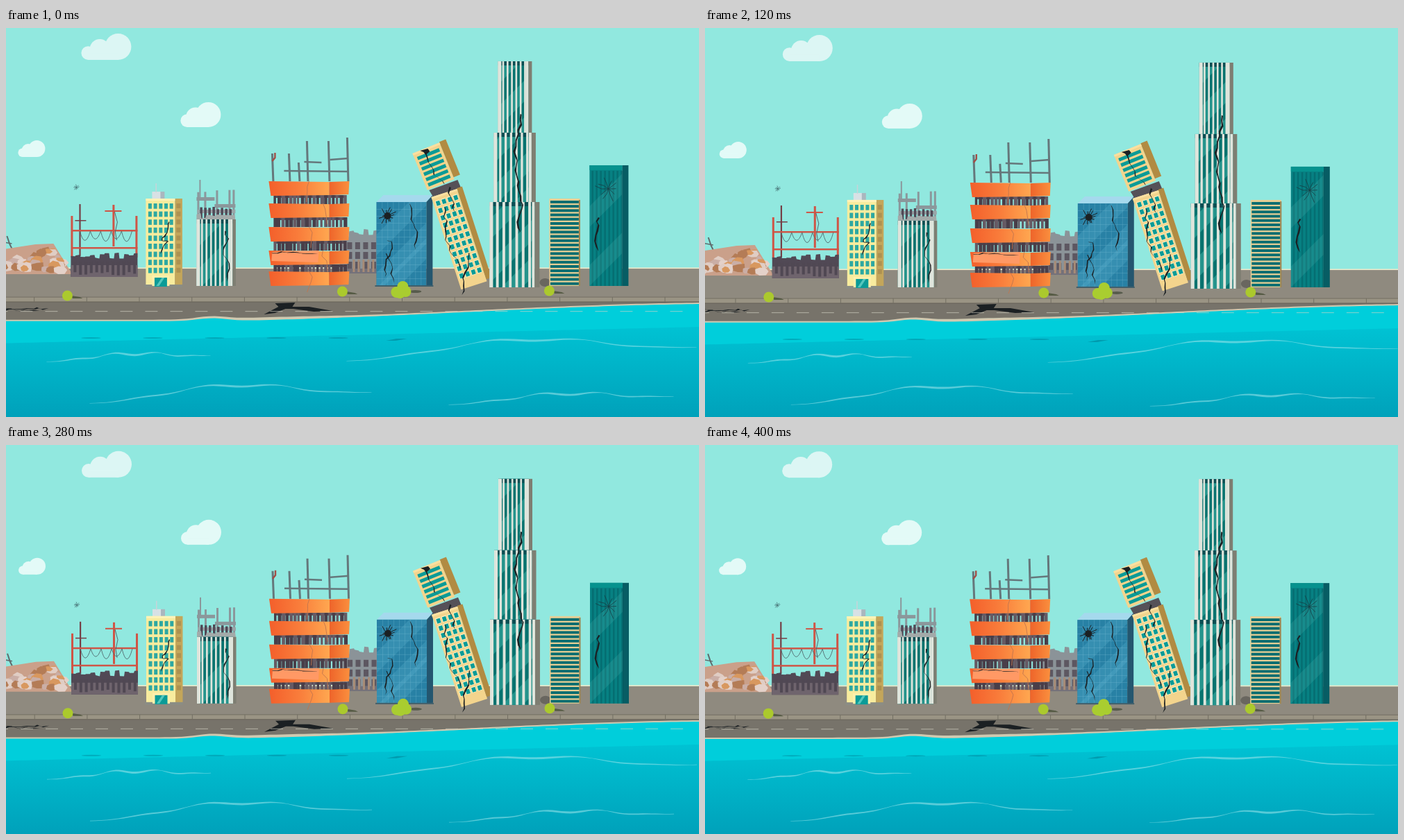
An HTML page with a canvas for the animation above (0.44 s loop, 998 px wide and 561 px high).

```html
<!DOCTYPE html>
<html>
<head>
<meta charset="utf-8">
<style>
html, body { margin: 0; width: 100%; height: 100%; overflow: hidden; background: #91e8df; }
canvas { display: block; }
</style>
</head>
<body>
<canvas id="stage" width="998" height="561"></canvas>
<script>
const g = document.getElementById('stage').getContext('2d');
const STEP = 40, STEPS = 11;
const INK = '#1b2023', TEAL = '#0b9b97';
let seed;
const rnd = () => (seed = seed * 16807 % 2147483647) / 2147483647;
const spread = d => (rnd() - .5) * d;
const bump = (x, center, width) => Math.exp(-(((x - center) / width) ** 2));

function repeat(n, draw) { for (let i = 0; i < n; i++) draw(i); }
function grid(rows, cols, draw) { repeat(rows, r => repeat(cols, c => draw(r, c))); }
function rect(color, x, y, w, h) { g.fillStyle = color; g.fillRect(x, y, w, h); }
function trace(p) {
  g.beginPath();
  for (let i = 0; i < p.length; i += 2) g.lineTo(p[i], p[i + 1]);
}
function poly(color, ...p) { trace(p); g.fillStyle = color; g.fill(); }
function line(color, width, ...p) {
  trace(p); g.strokeStyle = color; g.lineWidth = width; g.stroke();
}
function disc(color, x, y, rx, ry = rx) {
  g.beginPath(); g.ellipse(x, y, rx, ry, 0, 0, 7); g.fillStyle = color; g.fill();
}
function fade(x0, y0, x1, y1, ...colors) {
  const f = g.createLinearGradient(x0, y0, x1, y1);
  colors.forEach((c, i) => f.addColorStop(i / (colors.length - 1), c));
  return f;
}
function rotated(x, y, degrees, draw) {
  g.save(); g.translate(x, y); g.rotate(degrees * Math.PI / 180); draw(); g.restore();
}
// Diagonal reflections across a facade
function glare(color, x, y, w, h, ...bands) {
  g.save(); g.beginPath(); g.rect(x, y, w, h); g.clip();
  for (const b of bands) poly(color, x, y + b + w, x + w, y + b, x + w, y + b + 30, x, y + b + w + 30);
  g.restore();
}

// Wandering fissure of uneven thickness through a few points
function crack(width, ...p) {
  const left = [], right = [];
  for (let i = 0; i < p.length - 2; i += 2) {
    const dx = p[i + 2] - p[i], dy = p[i + 3] - p[i + 1];
    const n = Math.ceil(Math.hypot(dx, dy) / 8);
    repeat(n, k => {
      const x = p[i] + dx * k / n + spread(5), y = p[i + 1] + dy * k / n + spread(3);
      const w = width * (.2 + .4 * rnd());
      left.push(x - w, y); right.unshift(x + w, y + w);
    });
  }
  poly(INK, ...left, ...p.slice(-2), ...right);
}
function star(color, x, y, r, n, width) {
  repeat(n, i => {
    const a = i * 2 * Math.PI / n, b = a + spread(.6), d = r * (.5 + rnd() * .5);
    line(color, width, x, y, x + Math.cos(a) * d * .5, y + Math.sin(a) * d * .5,
      x + Math.cos(b) * d, y + Math.sin(b) * d);
  });
}
function jagged(color, x0, x1, top, bottom, height) {
  const p = [x0, bottom];
  for (let x = x0; x < x1; x += 7) {
    const y = top + rnd() * height;
    p.push(x, y, Math.min(x + 6, x1), y + spread(3));
  }
  poly(color, ...p, x1, bottom);
}
function cloud(color, x, bottom, w, h) {
  const big = h / 2, small = h * .26;
  disc(color, x + w - big, bottom - big, big);
  disc(color, x + w * .37, bottom - h * .41, h * .38);
  disc(color, x + small, bottom - small, small);
  rect(color, x + small, bottom - small, w - small - big, small);
}

function sky() {
  rect('#91e8df', -20, -20, 1040, 400);
  cloud('#dcf6f4', 108, 46, 72, 38);
  cloud('#e3faf7', 251, 143, 58, 36);
  cloud('#e3faf7', 17, 186, 39, 24);
  star('#456d70', 101, 230, 5, 8, .8);
}

function land() {
  rect('#8f8a7f', -20, 347, 1040, 42);
  rect('#eeeacb', -20, 345.5, 1040, 1.6);
  rect('#77736a', -20, 388, 1040, 45);
  rect('#9a9484', -20, 388, 1040, 7);
  rect('#736f63', -20, 387.6, 1040, 1);
  rect('#656157', -20, 394.5, 1040, 1);
  repeat(14, i => rect('#736f63', -36 + i * 75.7, 388, 1, 7));
}

function rubble() {
  line('#606a6c', 2, 1, 300, 5, 312, 12, 326);
  line('#606a6c', 1.5, -8, 308, 8, 311);
  const colors = ['#e0cdc4', '#d8985f', '#caaea6', '#b47c56', '#e4d1c9'];
  poly('#caa08a', -10, 355, -10, 320, 42, 312, 68, 311, 95, 355);
  repeat(40, i => {
    const t = i / 39, x = -6 + rnd() * 95;
    const top = 312 + Math.abs(x - 55) * .45 + Math.max(0, x - 70);
    const y = top + 4 + t * (345 - top), r = 5 + rnd() * 5, p = [];
    repeat(7, k => p.push(x + Math.cos(k * .9) * (r + spread(4)),
      Math.min(355, y + Math.sin(k * .9) * (r * .75 + spread(3)))));
    poly(colors[i % 5], ...p);
  });
}

function redFrame() {
  const red = '#cf5546', old = '#753f46', wire = '#526b70';
  rect(old, 105, 254, 2.2, 75);
  rect(old, 99, 277, 16, 1.5);
  for (const x of [93, 153, 186]) rect(red, x, x === 153 ? 255 : 271, 3, 60);
  for (const y of [291, 316]) rect(red, 94, y, 95, 2.5);
  rect(red, 142, 263, 24, 2);
  repeat(5, i => {
    const x = 106 + i * 15;
    g.beginPath(); g.moveTo(x, 293);
    g.quadraticCurveTo(x + 7, 305 + rnd() * 22, x + 15, 293);
    g.strokeStyle = wire; g.lineWidth = .9; g.stroke();
  });
  line(wire, 1, 156, 265, 160, 280, 157, 294, 159, 306);
  jagged('#514955', 93, 189, 324, 359, 10);
  rect('#6f646d', 93, 342, 96, 17);
  repeat(12, i => rect('#504853', 97 + i * 7.8, 337, 4, 15 + rnd() * 5));
}

function yellowBlock() {
  rect('#d8e1e5', 210, 236, 13, 11);
  rect('#aab7be', 222, 236, 6, 11);
  rect('#c7d4d8', 215, 224, 1.5, 13);
  rect('#f8ec9e', 201, 246, 42, 126);
  rect('#c4a65a', 243, 246, 10.5, 126);
  rect('#fff3b8', 201, 246, 42, 3);
  grid(9, 5, (r, c) => rect('#2da8a2', 204.5 + c * 7.7, 253 + r * 11.6, 5, 7.7));
  repeat(9, r => rect('#ae9150', 245, 253 + r * 11.6, 6, 7));
  rect('#8b8d85', 199, 370, 55, 4);
  rect('#fff0ac', 210, 357, 25, 15);
  rect(TEAL, 213.5, 360, 18, 13);
  poly('#55c7bd', 216, 372, 224, 360, 228, 360, 220, 372);
  crack(1.6, 233, 278, 235, 290, 222, 304, 231, 307, 222, 326);
}

// Glass wall behind evenly spaced white fins
function tower(x, y, face, side, h, bars) {
  rect('#08736f', x, y, face, h);
  glare('#25948c', x, y, face, h, -40, 22, 75);
  const pitch = face / bars;
  rect('#0b4e53', x, y, face, 6);
  repeat(bars, i => rect('#dfe5dc', x + i * pitch, y, pitch * .42, h));
  rect('#dfe5dc', x, y, 5, h);
  rect('#dfe5dc', x + face - 4, y, 4, h);
  rect('#7e7e72', x + face, y, side, h);
}

function greyTower() {
  const gray = '#8b979b';
  for (const x of [275, 285, 302, 320, 326]) rect(gray, x, 236 + spread(6), 3, 40);
  rect(gray, 278, 219, 2, 30);
  rect(gray, 274, 244, 26, 5);
  rect(gray, 300, 254, 30, 5);
  rect('#9aa6a9', 275, 262, 55, 5);
  repeat(8, i => rect('#504956', 279 + i * 6, 253 + rnd() * 9, 3.5, 19));
  jagged('#a3aaa9', 274, 330, 268, 277, 7);
  tower(274, 276, 52, 4.5, 96, 8);
  crack(1.8, 315, 293, 319, 302, 311, 321, 321, 347, 318, 366);
}

function orangeBlock() {
  const steel = '#65777b', floors = [221, 253, 287, 321, 351];
  for (const [x, top] of [[383, 181], [407, 181], [421, 194], [433, 163], [464, 163], [491, 158]])
    line(steel, 3, x, top, x + 1.5, 221);
  line(steel, 2.5, 400, 206, 493, 207);
  line(steel, 2.5, 429, 193, 454, 194);
  line(steel, 2.5, 466, 190, 492, 188);
  line('#a34d45', 2.4, 383, 192, 387, 187, 387, 180);
  for (const y of floors.slice(0, 4)) {
    rect('#574c56', 386, y + 20, 102, 4);
    for (let x = 385; x < 488; x += 5.6) {
      const w = 3 + rnd() * 3;
      rect(rnd() < .6 ? '#493e49' : '#665a64', x, y + 20, w, 14);
    }
  }
  floors.forEach((y, i) => {
    const b = y + 21;
    poly(fade(378, 0, 465, 0, '#f35f2b', '#f97d3b', '#ffa750'), 378, y, 465, y + 1, 465, b - 1, 381, b);
    poly(fade(465, 0, 494, 0, '#ee642a', '#fa8f3e'), 465, y + 1, 494, y, 493, b - 2, 465, b - 1);
    const x = 436 + i % 2 * 20;
    line('#c1754f', .9, x, y, x + spread(12), y + 8, x + spread(12), y + 15, x + spread(14), y + 30);
  });
  poly('#ff9965', 383, 323, 450, 321, 449, 338, 382, 336);
  crack(1.8, 382, 323, 449, 326);
}

function backRuin() {
  jagged('#8b9398', 480, 535, 288, 348, 14);
  grid(3, 4, (r, c) => rect('#5d5761', 491 + c * 11.5, 309 + r * 14, 7, 10));
  rect('#74717a', 488, 347, 46, 7);
  repeat(5, i => rect('#a78b76', 499 + i * 7, 334, 3, 18));
}

function blueBlock() {
  poly('#a5d9ed', 533, 251, 543, 241, 614, 241, 605, 251);
  rect('#2881a5', 533, 251, 72, 121);
  poly('#24566f', 605, 251, 614, 241, 614, 371, 605, 372);
  glare('rgba(95,182,211,.25)', 533, 251, 72, 121, -25, 30, 52);
  for (let x = 541; x < 605; x += 8) rect('rgba(121,189,211,.35)', x, 251, .8, 121);
  for (let y = 261; y < 372; y += 10) rect('rgba(121,189,211,.35)', 533, y, 72, .8);
  rect('#405f6b', 531, 371, 84, 2);
  star(INK, 549, 271, 14, 13, 1);
  disc(INK, 549, 271, 5);
  crack(1.8, 583, 253, 584, 275, 590, 287, 590, 321);
  crack(1.5, 549, 307, 557, 310, 550, 328, 545, 360);
  crack(1.5, 548, 326, 555, 346, 558, 368);
}

function slab(face, side, h, paint) {
  rect('#f3d48d', 0, 0, face, h);
  rect('#b18b42', face, -1, side, h - 2);
  rect('#fae0a1', 0, 0, face, 3);
  paint();
}
function leaningBlock() {
  poly('#555158', 609, 234, 650, 219, 655, 231, 615, 244);
  rotated(612, 244, -17.9, () => slab(39, 8, 140, () => grid(11, 4, (r, c) => {
    rect('#fff3c8', 3 + c * 8.9, 7 + r * 11, 7.2, 8.5);
    rect(TEAL, 4 + c * 8.9, 8 + r * 11, 5.6, 6.8);
  })));
  rotated(585, 181, -22, () => slab(42, 10, 57, () =>
    repeat(6, r => rect(TEAL, 4, 7 + r * 8.2, 34, 5))));
  poly(INK, 596, 177, 607, 174, 610, 178, 604, 183, 601, 179);
  crack(2, 603, 178, 613, 206, 637, 230, 646, 266);
  crack(1.7, 631, 258, 634, 306, 654, 349);
  crack(2, 668, 323, 660, 360, 656, 385);
}

function skyscraper() {
  tower(708, 48, 44, 5, 103, 7);
  tower(702, 151, 54.5, 6, 100, 7);
  tower(696, 251, 65, 7, 123, 7);
  crack(2.6, 742, 123, 733, 170, 737, 228, 744, 255, 736, 274, 741, 295);
}

function rightBlocks() {
  disc('#69665f', 776, 367, 8, 6);
  rect('#e7cf95', 782, 246, 44, 126);
  for (let y = 249; y < 369; y += 6.2) rect('#076c70', 783.5, y, 41, 3.9);
  rect('#9d8450', 824.5, 248, 2, 124);

  rect('#078183', 840, 198, 47, 174);
  rect('#075d64', 887, 198, 9, 174);
  rect('#06928e', 840, 198, 47, 7);
  for (let x = 843; x < 886; x += 6) rect('rgba(0,66,75,.3)', x, 206, 2.5, 166);
  glare('rgba(116,202,194,.15)', 840, 205, 47, 167, 5, 90);
  star('#173d43', 867, 232, 20, 10, .8);
  crack(3, 851, 274, 854, 285, 850, 307, 853, 322);
}

function street() {
  for (const [x, y] of [[88, 386], [484, 380], [782, 379]]) {
    poly('#565b45', x, y - 1, x + 18, y + 2, x + 22, y + 4, x + 8, y + 4);
    disc('#abc92d', x, y, 7.5);
  }
  disc('#575b4c', 589, 380, 9, 2);
  for (const [x, y] of [[562, 381], [571, 373], [575, 380], [567, 382]]) disc('#a9cd30', x, y, 8);

  poly(INK, 371, 413, 392, 402, 387, 397, 416, 396, 412, 402, 436, 402, 470, 408,
    443, 409, 413, 405, 402, 405, 387, 411);
  crack(2.5, -10, 407, 24, 404, 61, 404);
  crack(2, -10, 400, 13, 408, 48, 408);
}

function shoreline(x) {
  const t = Math.min(1, Math.max(0, (x - 250) / 800));
  return 422 - 25 * t * t * (3 - 2 * t) - 4 * bump(x, 295, 30);
}
function water(color, edge) {
  const p = [];
  for (let x = -20; x <= 1020; x += 8) p.push(x, edge(x));
  poly(color, ...p, 1020, 590, -20, 590);
}
// Swell between two ends, lifted in the middle, with a small ripple
function wave(x0, y0, x1, y1, lift) {
  const top = [], under = [];
  for (let t = 0; t <= 1.001; t += .02) {
    const x = x0 + (x1 - x0) * t, s = Math.sin(Math.PI * t);
    const y = y0 + (y1 - y0) * t - lift * s * s + 2 * s * Math.cos(8 * Math.PI * (t - .54));
    top.push(x, y);
    under.unshift(x, y + .6 + 2.4 * s * Math.abs(Math.sin(9 * t)));
  }
  poly('rgba(160,230,235,.55)', ...top, ...under);
}
function sea() {
  water('#d0c9b0', x => shoreline(x) - 1.2 - 2 * bump(x, 390, 110));
  water('#00cedb', x => shoreline(x) + .8);
  water(fade(0, 432, 0, 561, '#00c2d3', '#00a1ba'), x => 454.5 - x * .0235);
  repeat(28, i => rect('rgba(215,213,198,.55)', -16 + i * 36, 408, 18, 1.2));
  repeat(5, i => disc('rgba(0,112,133,.38)', 122 + i * 89, 447, 14, 1));
  poly('rgba(0,112,133,.45)', 547, 451, 562, 448, 577, 448, 561, 451);
  wave(58, 481, 294, 472, 8);
  wave(120, 541, 526, 525, 19);
  wave(490, 480, 994, 460, 22);
  wave(637, 543, 961, 531, 11);
}

const scene = [sky, land, rubble, redFrame, yellowBlock, greyTower, backRuin, orangeBlock,
  blueBlock, leaningBlock, skyscraper, rightBlocks, street, sea];
const sway = (middle, reach, peak, step) => middle + reach * Math.cos(Math.PI * (step - peak) / 3);
let shown = -1;
function play() {
  const step = Math.floor(performance.now() / STEP) % STEPS;
  if (step !== shown) {
    shown = step;
    seed = 4217;
    g.setTransform(1, 0, 0, 1, sway(2.1, 1.72, 3.16, step), sway(.97, 1.05, 2.65, step));
    scene.forEach(draw => draw());
  }
  requestAnimationFrame(play);
}
play();
</script>
</body>
</html>
```
